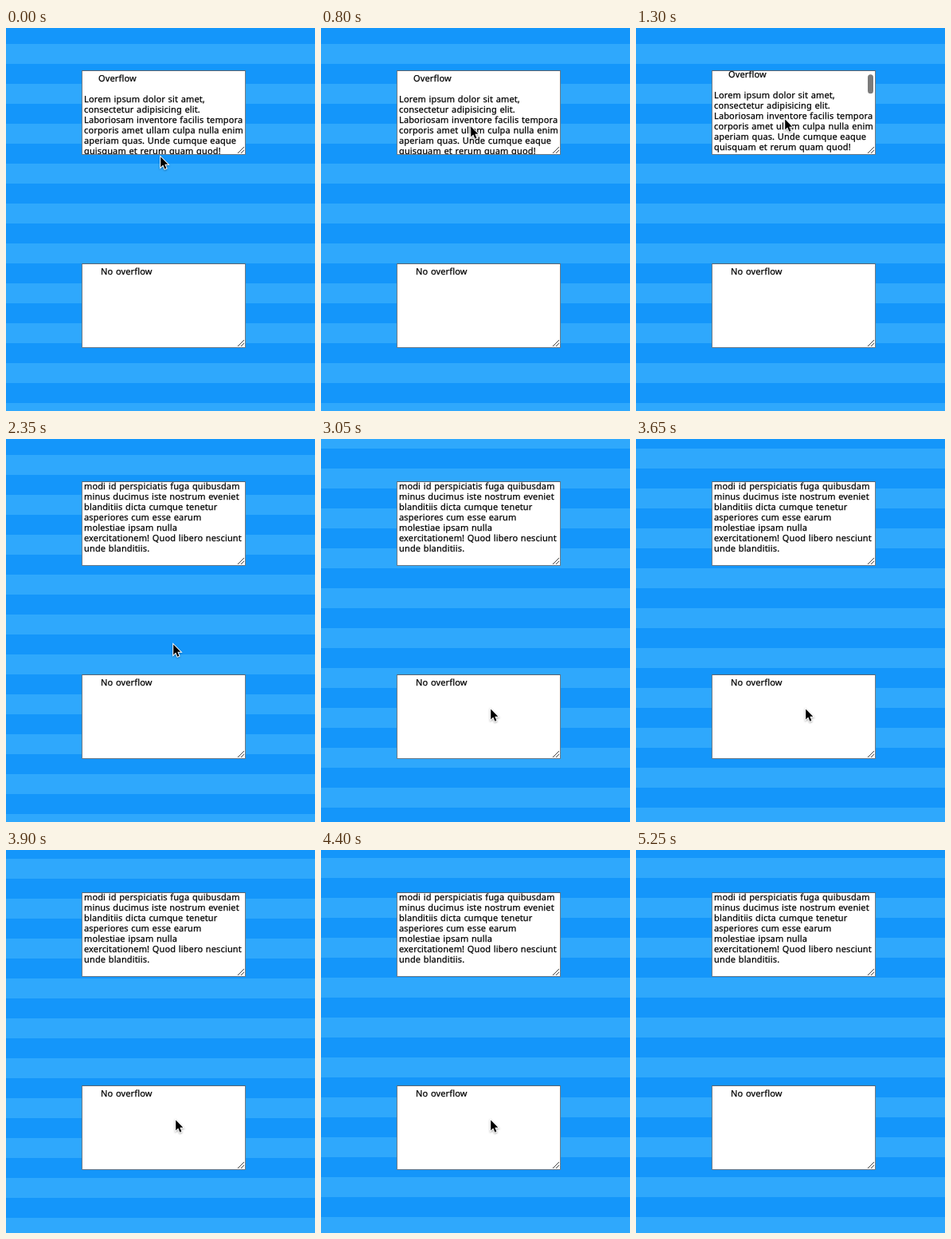
An HTML page that plays this animation: 388x480 px, repeating every 5.3 s.

```html
<!DOCTYPE html>
<html lang="en">
<head>
<meta charset="utf-8">
<title>Overflow scrolling</title>
<style>
  html, body { margin: 0; width: 100%; height: 100%; overflow: hidden; }
  #stage {
    position: relative; width: 388px; height: 480px; overflow: hidden;
    background: repeating-linear-gradient(#1496fa 0 25px, #2fa8fc 25px 50px);
    background-size: 100% 50px;
  }
  .box {
    position: absolute; left: 95px; width: 204px; height: 104px; overflow: hidden;
    background: #fff; border: 1px solid #6e7a86; border-top-color: #566270;
  }
  .text {
    position: absolute; left: 2px; top: 3px; white-space: pre; color: #000;
    font: 11px/13px "Noto Sans", "Open Sans", sans-serif;
    letter-spacing: .14px; word-spacing: .6px;
    text-rendering: geometricPrecision; -webkit-text-stroke: .25px #000;
  }
  .grip { position: absolute; right: 1px; bottom: 1px; width: 8px; height: 8px; }
  .grip path { stroke: #444; fill: none; }
  #thumb {
    position: absolute; left: 195px; top: 3px; width: 7px; height: 24px;
    border-radius: 4px; background: #7b7b7b;
  }
  #cursor {
    position: absolute; left: 0; top: 0; width: 14px; height: 20px; overflow: visible;
    filter: drop-shadow(0 1px 1px rgba(0, 0, 0, .35));
  }
</style>
</head>
<body>
<div id="stage">
  <div class="box" style="top:53px">
    <div class="text" id="copy"><div style="padding-left:18px">Overflow</div>
Lorem ipsum dolor sit amet,
consectetur adipisicing elit.
Laboriosam inventore facilis tempora
corporis amet ullam culpa nulla enim
aperiam quas. Unde cumque eaque
quisquam et rerum quam quod!

Odit libero nihil dolorum similique
tempore quidem fugiat veritatis.
Earum saepe illum provident nobis
voluptas animi sequi ratione.

Lorem ipsum dolor sit amet,
consectetur adipisicing elit. Fuga
magni quos reiciendis dolore eius
harum labore vitae possimus.
Necessitatibus iure optio dolorem
accusamus fugit placeat ipsa.

Lorem ipsum dolor sit amet,
consectetur adipisicing elit. Sint
delectus at maiores eligendi rem
nemo officia quae laborum! Eos
modi id perspiciatis fuga quibusdam
minus ducimus iste nostrum eveniet
blanditiis dicta cumque tenetur
asperiores cum esse earum
molestiae ipsam nulla
exercitationem! Quod libero nesciunt
unde blanditiis.</div>
    <div id="thumb"></div>
    <svg class="grip" viewBox="0 0 8 8"><path d="M0 8L8 0M4 8L8 4"/></svg>
  </div>
  <div class="box" style="top:295px">
    <div class="text" style="padding-left:21px">No overflow</div>
    <svg class="grip" viewBox="0 0 8 8"><path d="M0 8L8 0M4 8L8 4"/></svg>
  </div>
  <svg id="cursor" viewBox="0 0 14 20">
    <path d="M1.2 1.6V14.4L4.2 11.6L6.4 16.7L8.4 15.8L6.3 10.8H10.3Z" fill="#000" stroke="#fff"
      stroke-width="2" paint-order="stroke"/>
  </svg>
</div>
<script>
const LOOP = 5300, STEP = 50;
const TEXT_SCROLL = 329, PAGE_SCROLL = 360, THUMB_TRAVEL = 74;
const $ = id => document.getElementById(id);
const stage = $('stage'), copy = $('copy'), thumb = $('thumb'), cursor = $('cursor');

const ramp = (t, from, to) => Math.min(1, Math.max(0, (t - from) / (to - from)));
const smooth = p => p * p * (3 - 2 * p);
const smoother = p => p * p * p * (10 - 15 * p + 6 * p * p);
const easeOut = p => Math.sin(p * Math.PI / 2);

const home = { x: 193, y: 160 };
const glides = [
  { from: 0, to: 350, dx: -6, dy: -34 },
  { from: 600, to: 1150, dx: -1, dy: -13 },
  { from: 1800, to: 2250, dx: 23, dy: 143 },
  { from: 2350, to: 2800, dx: 3, dy: 81 },
  { from: 4500, to: 5050, dx: -122, dy: -361 }
];

function pointer(t) {
  let { x, y } = home;
  for (const g of glides) {
    const k = smooth(ramp(t, g.from, g.to));
    x += g.dx * k;
    y += g.dy * k;
  }
  return [Math.round(x), Math.round(y)];
}

function draw(now) {
  const t = Math.floor(now % LOOP / STEP) * STEP;
  const [x, y] = pointer(t);
  const progress = smoother(ramp(t, 1200, 2000));
  const page = Math.ceil(PAGE_SCROLL * easeOut(ramp(t, 2805, 4472)));

  cursor.style.transform = `translate(${x}px, ${y}px)`;
  copy.style.transform = `translateY(${-Math.round(TEXT_SCROLL * progress)}px)`;
  thumb.style.transform = `translateY(${THUMB_TRAVEL * progress}px)`;
  thumb.style.opacity = ramp(t, 1150, 1250) - ramp(t, 2050, 2250);
  stage.style.backgroundPosition = `0 ${-5 - page}px`;
}

const start = performance.now();
function tick() {
  draw(performance.now() - start);
  requestAnimationFrame(tick);
}
tick();
</script>
</body>
</html>
```
